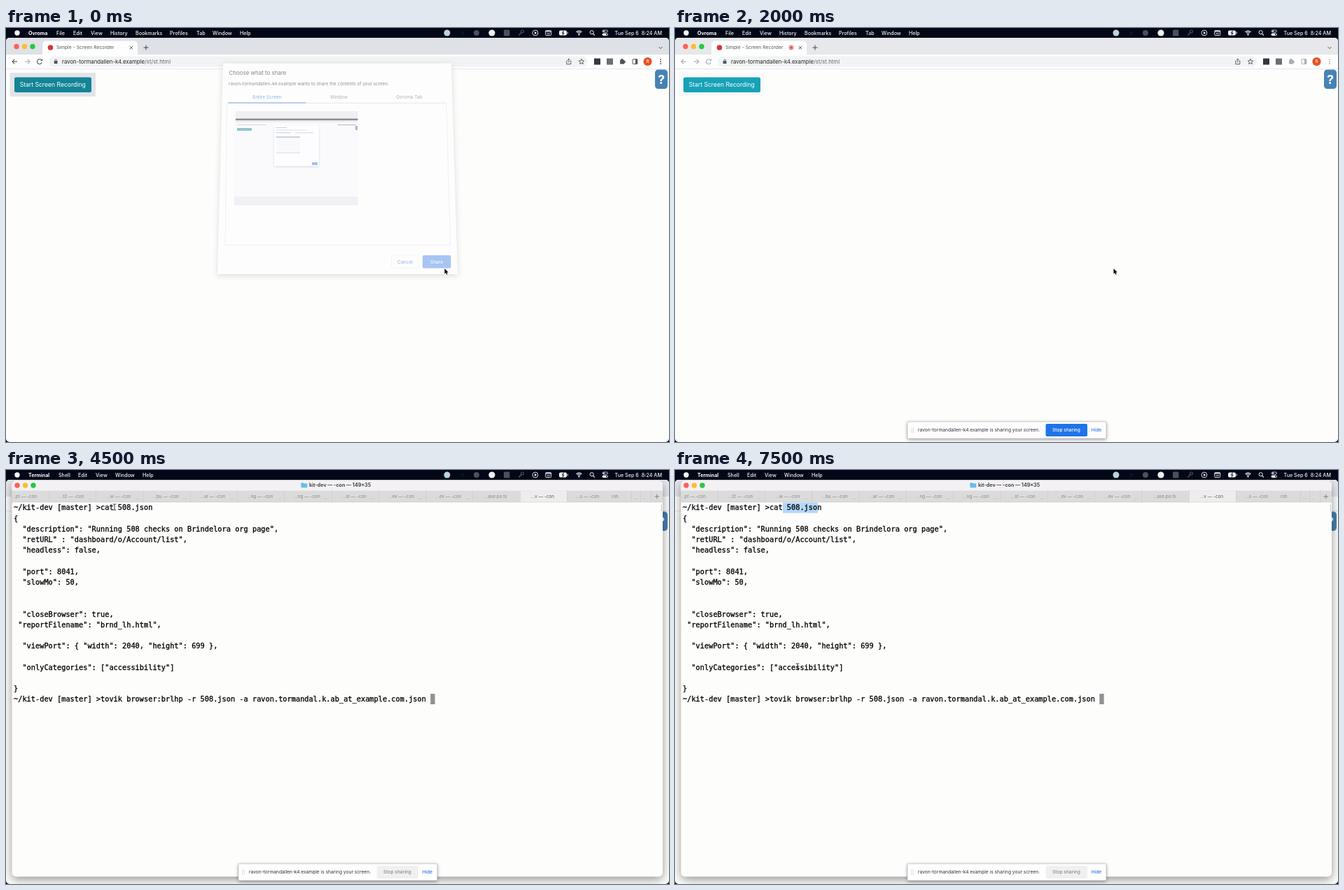
These frames come from a looping animation (947x592 px, 8 s). An HTML page with a canvas:

```html
<!DOCTYPE html>
<html lang="en">
<head>
<meta charset="utf-8">
<title>Screen recording demo</title>
<style>
  html, body { margin: 0; width: 100%; height: 100%; overflow: hidden; background: #000; }
  canvas { display: block; }
</style>
</head>
<body>
<canvas id="stage" width="947" height="592"></canvas>
<script>
const ctx = document.getElementById('stage').getContext('2d');
const LOOP = 8000, STEP = 500;
const HOST = 'ravon-tormandallen-k4.example';
const SANS = 'Inter, "Open Sans", sans-serif';
const MONO = '"DejaVu Sans Mono", "Liberation Mono", monospace';

// y is the middle of the capital letters
function text(str, x, y, size, color, weight = 400, align = 'left') {
  ctx.font = `${weight} ${size}px ${SANS}`;
  ctx.textAlign = align;
  ctx.fillStyle = color;
  ctx.fillText(str, x, y + size * 0.364);
}

function box(x, y, w, h, color, r = 0) {
  ctx.fillStyle = color;
  ctx.beginPath();
  ctx.roundRect(x, y, w, h, r);
  ctx.fill();
}

function frame(x, y, w, h, color, r = 0, width = 1) {
  ctx.strokeStyle = color;
  ctx.lineWidth = width;
  ctx.beginPath();
  ctx.roundRect(x, y, w, h, r);
  ctx.stroke();
}

function disc(x, y, r, color) {
  ctx.fillStyle = color;
  ctx.beginPath();
  ctx.arc(x, y, r, 0, 7);
  ctx.fill();
}

function ring(x, y, r, color, width = 1, from = 0, to = 2 * Math.PI) {
  ctx.strokeStyle = color;
  ctx.lineWidth = width;
  ctx.beginPath();
  ctx.arc(x, y, r, from, to);
  ctx.stroke();
}

function trace(points) {
  ctx.beginPath();
  points.forEach(([x, y], i) => i ? ctx.lineTo(x, y) : ctx.moveTo(x, y));
}

function line(points, color, width = 1) {
  trace(points);
  ctx.strokeStyle = color;
  ctx.lineWidth = width;
  ctx.stroke();
}

function shadowed(blur, color, dy, draw) {
  ctx.save();
  ctx.shadowBlur = blur;
  ctx.shadowColor = color;
  ctx.shadowOffsetY = dy;
  draw();
  ctx.restore();
}

function lights(x, y) {
  ['#ff5f57', '#febc2e', '#28c840'].forEach((c, i) => disc(x + i * 11.5, y, 3.7, c));
}

function menuBar(app, items) {
  box(0, 0, 947, 14, '#020817');
  disc(16, 7, 3.7, '#f4f4f6');
  text(app, 32, 7, 7.1, '#fff', 700);
  items.forEach(([name, x]) => text(name, x, 7, 7.15, '#f4f4f6', 500));

  const w = '#f0f0f3', dim = '#4b505c';
  disc(630, 7, 4.5, '#b9d5d8');
  disc(652, 7, 2.5, '#0c1322');
  disc(672, 7, 4, dim);
  disc(694, 7, 4.6, w);
  box(711, 2.5, 8.5, 9, dim, 1.5);
  ring(737.5, 5, 2, dim, 1.2);
  line([[736, 6.6], [732.5, 10.5]], dim, 1.5);
  ring(756, 7, 3.9, w, 0.9);
  trace([[755, 5], [758.3, 7], [755, 9]]);
  ctx.fillStyle = w;
  ctx.fill();
  frame(770.7, 3.5, 8, 7, w, 1, 0.9);
  line([[771, 5], [779, 5]], w, 1.3);
  line([[772.5, 8], [777, 8]], w);
  box(790, 3.5, 11, 7, w, 2);
  box(801.7, 5.5, 1, 3, w);
  line([[796.5, 4], [794.5, 7.3], [797, 7], [795, 10]], '#020817', 1);
  [1.6, 3.6, 5.6].forEach(r => ring(818.5, 9.7, r, w, 1.2, Math.PI * 1.25, Math.PI * 1.75));
  disc(818.5, 9.7, 0.9, w);
  ring(836.7, 6.2, 2.6, w, 1);
  line([[838.6, 8.2], [840.8, 10.5]], w, 1.1);
  frame(852, 3, 7.5, 3, w, 1.5, 0.8);
  box(851.6, 7.4, 8.3, 3.7, w, 1.8);
  disc(854, 4.5, 1.1, w);
  disc(858, 9.2, 1, '#020817');
  text('Tue Sep 6  8:24 AM', 937, 7, 7.2, w, 500, 'right');
}

function toolbar(active) {
  const dark = '#505357', c = active ? dark : '#a9acb0';
  line([[16, 48], [9, 48]], c, 1.1);
  line([[12.3, 44.7], [9, 48], [12.3, 51.3]], c, 1.1);
  line([[27, 48], [34, 48]], '#a9acb0', 1.1);
  line([[30.7, 44.7], [34, 48], [30.7, 51.3]], '#a9acb0', 1.1);
  ring(48, 48, 3.4, c, 1.1, 0.4, 5.4);
  trace([[49.2, 46.9], [52, 46.9], [52, 43.8]]);
  ctx.fillStyle = c;
  ctx.fill();

  box(61, 40.5, 770, 15, '#f1f3f4', 7.5);
  box(68.7, 47, 4.8, 4, dark, 0.6);
  ring(71.1, 46.7, 1.5, dark, 0.9, Math.PI, 0);
  text(HOST, 80, 48, 7.8, '#25272a');
  const hostWidth = ctx.measureText(HOST).width;
  text('/st/st.html', 80 + hostWidth, 48, 7.8, '#666a6e');

  line([[802, 47], [800.8, 47], [800.8, 51.7], [806.8, 51.7], [806.8, 47], [805.6, 47]], dark, 0.9);
  line([[803.8, 49.5], [803.8, 44]], dark, 0.9);
  line([[802.2, 45.5], [803.8, 44], [805.4, 45.5]], dark, 0.9);
  const star = [...Array(11).keys()].map(i => {
    const a = i * Math.PI / 5 - Math.PI / 2, r = i % 2 ? 1.8 : 4;
    return [822 + r * Math.cos(a), 48.2 + r * Math.sin(a)];
  });
  line(star, dark, 0.9);
  box(840, 43.5, 9, 9, '#343840');
  box(858, 43.5, 9, 9, '#6b6e72');
  box(877, 45.5, 6.3, 6, c, 0.8);
  disc(879.8, 45.2, 1.4, c);
  disc(883.4, 48.5, 1.4, c);
  frame(895, 44.6, 6.8, 6.8, c, 0.8, 1);
  box(899, 44.6, 2.8, 6.8, c);
  disc(916.5, 48, 6.1, '#e8501f');
  text('R', 916.5, 48, 6.5, '#fff', 400, 'center');
  [45, 48, 51].forEach(y => disc(935, y, 0.9, c));
}

function browser(active, recording) {
  box(0, 14, 947, 578, '#fdfdfc', 5);
  box(0, 14, 947, 25, active ? '#dee1e6' : '#e7e8eb', [5, 5, 0, 0]);
  lights(15, 26.5);
  box(52, 18.5, 136, 21, '#fefefe', [5, 5, 0, 0]);
  box(0, 38, 947, 20, '#fefefe');
  disc(63.5, 28, 3.8, '#d7323a');
  text('Simple - Screen Recorder', 72, 28, 6.8, '#55585c');
  if (recording) {
    ring(166, 28, 2.9, '#dc3b36', 0.9);
    disc(166, 28, 1.7, '#dc3b36');
  }
  line([[176.6, 26], [181, 30.4]], '#505357', 1);
  line([[181, 26], [176.6, 30.4]], '#505357', 1);
  line([[196.5, 28], [203.5, 28]], '#505357', 1.1);
  line([[200, 24.5], [200, 31.5]], '#505357', 1.1);
  line([[932.5, 27], [935, 29.5], [937.5, 27]], '#505357', 1);
  toolbar(active);
  box(0, 58, 947, 0.8, '#dfe1e3');

  box(5.5, 64, 122.5, 34, recording ? '#f8f9fa' : '#e0e4e7', 2);
  box(12, 70.5, 110, 21.5, recording ? '#17a2b8' : '#138496', 2.5);
  text('Start Screen Recording', 66.7, 81.3, 8.6, '#fff', 400, 'center');
  box(927, 59.5, 18, 27.5, '#4682b4', 4.5);
  text('?', 936, 73, 18, '#fff', 700, 'center');
}

function preview() {
  box(326, 119, 176.5, 134.5, '#fafafc');
  box(328, 119, 174.5, 10.5, '#f0f0f3');
  box(328, 129.5, 174.5, 2.6, '#8b8d93');
  box(328, 132.1, 174.5, 3, '#ecedf1');
  line([[330, 138.5], [372, 138.5]], '#cdd0d4', 0.8);
  line([[474, 138.5], [500, 138.5]], '#b9bcc2', 1.2);
  box(330, 143, 21, 4, '#93c5ce');
  box(499, 140, 3, 6, '#9eb9d3');
  shadowed(3, '#0002', 1, () => box(383, 139.5, 64, 58, '#fdfdff'));
  line([[385, 142.5], [401, 142.5]], '#c5c7cc', 0.8);
  line([[385, 146], [430, 146]], '#d3d5da', 0.8);
  line([[386, 149.8], [407, 149.8]], '#a6c2ec', 0.8);
  line([[413, 149.8], [439, 149.8]], '#cdd0d4', 0.8);
  box(386, 153, 34, 27, '#f9f9fc');
  line([[386, 156], [420, 156]], '#a9acb5', 1.2);
  line([[386, 178.5], [420, 178.5]], '#dedfe6', 1.2);
  box(437, 192, 8, 4, '#a3c1f1');
  box(326, 241, 176.5, 12.5, '#f0f0f5');
}

function dialog() {
  shadowed(9, 'rgba(60,60,80,.18)', 2, () => {
    trace([[310, 50.5], [636, 50.5], [645, 352], [302, 352]]);
    ctx.fillStyle = '#fdfdfd';
    ctx.fill();
  });
  text('Choose what to share', 318.5, 64, 7.95, '#85878a');
  text(HOST + ' wants to share the contents of your screen.', 318, 80, 6.38, '#929497');
  text('Entire Screen', 373, 98.5, 6.6, '#8fb3ec', 400, 'center');
  text('Window', 475.5, 98.5, 6.5, '#aeb0b4', 400, 'center');
  text('Ovroma Tab', 576, 98.5, 6.5, '#aeb0b4', 400, 'center');
  line([[315.5, 107.3], [313, 310.5], [634.5, 310.5], [629, 107.3]], '#ececf0', 0.8);
  line([[317, 107.3], [629, 107.3]], '#e1e3e8', 0.8);
  line([[317, 107], [428.5, 107]], '#82aaed', 1.2);
  preview();
  frame(550.5, 325, 39, 18.5, '#f2f3f7', 2, 0.8);
  text('Cancel', 570, 334.3, 6.7, '#91b2ec', 400, 'center');
  box(595, 325, 40.5, 18.5, '#a8c5f3', 2);
  text('Share', 615, 334.3, 6.6, '#fff', 400, 'center');
}

function shareBar(active) {
  shadowed(5, 'rgba(0,0,0,.4)', 1.5, () => box(332, 563, 284, 24, '#fefefe', 1));
  frame(332, 563, 284, 24, '#b8babd', 1, 0.7);
  for (let i = 0; i < 8; i++) disc(338 + i % 2 * 2.4, 572 + (i >> 1) * 2, 0.6, '#b4b6b9');
  text(HOST + ' is sharing your screen.', 347, 575, 6.67, '#2f3236');
  box(529.5, 566, 59.5, 18, active ? '#1f74e8' : '#f0f0f0', 2);
  text('Stop sharing', 559, 575, 6.6, active ? '#fff' : '#85878a', 500, 'center');
  text('Hide', 594.7, 575, 6.5, '#2775e6', 500);
}

const LINES = [
  '~/kit-dev [master] >cat 508.json',
  '{',
  '  "description": "Running 508 checks on Brindelora org page",',
  '  "retURL" : "dashboard/o/Account/list",',
  '  "headless": false,',
  '',
  '  "port": 8041,',
  '  "slowMo": 50,',
  '', '',
  '  "closeBrowser": true,',
  ' "reportFilename": "brnd_lh.html",',
  '',
  '  "viewPort": { "width": 2040, "height": 699 },',
  '',
  '  "onlyCategories": ["accessibility"]',
  '',
  '}',
  '~/kit-dev [master] >tovik browser:brlhp -r 508.json -a ravon.tormandal.k.ab_at_example.com.json'
];
const TABS = ['pt', 't2', 'w', 'bu', 'ar', 'ng', 'ng', 'st', 'ev', 'ev', 'ase.po.ts', 'v', 's'];

function terminal(selectEnd) {
  shadowed(14, 'rgba(0,0,0,.42)', 4, () => box(8.5, 15, 929.5, 566.5, '#fdfefc', 6));
  box(8.5, 15, 929.5, 15, '#f3f1f3', [6, 6, 0, 0]);
  box(8.5, 29.5, 929.5, 16.5, '#dcdbdc');
  lights(16, 22);
  box(421.5, 18.5, 4, 3, '#4aa9dc', 0.8);
  box(421.5, 19.3, 8.8, 6, '#62bfec', 0.8);
  text('kit-dev — -con — 149×35', 433, 21.8, 7.1, '#47474a', 700);

  TABS.forEach((name, i) => {
    const x = 734 + (i - 11) * 67.3, active = i === 11;
    if (active) box(x, 29.5, 67.3, 16.5, '#eeedee');
    box(Math.max(8.5, x), 29.5, 0.6, 16.5, '#c9c8c9');
    const label = '…' + name + (i === 10 ? '' : ' — -con');
    text(label, x + (i === 12 ? 29.5 : 32.5), 38, 6.4, active ? '#5c5c5e' : '#88888a', 400, 'center');
    if (i && i < 10) text('…', x + 59.5, 40, 6.4, '#8b8b8d', 400, 'center');
  });
  text('rsh.', 865, 38, 6.4, '#88888a');
  text('…', 897, 40, 6.4, '#8b8b8d');
  text('..', 910, 40, 6.4, '#8b8b8d');
  [893, 906, 921].forEach(x => box(x, 29.5, 0.6, 16.5, '#c9c8c9'));
  line([[926.5, 38], [933, 38]], '#777779', 0.9);
  line([[929.7, 34.8], [929.7, 41.2]], '#777779', 0.9);
  box(8.5, 45.7, 929.5, 0.6, '#c4c3c4');
  box(935.8, 49, 1, 10, '#c2c2c4');

  if (selectEnd) box(154, 46.5, selectEnd - 154, 15, '#b3d7fb');
  ctx.font = `10.3px ${MONO}`;
  ctx.textAlign = 'left';
  ctx.fillStyle = ctx.strokeStyle = '#000';
  ctx.lineWidth = 0.3;
  LINES.forEach((row, i) => {
    const y = 57.4 + i * 15.22;
    ctx.fillText(row, 11, y);
    ctx.strokeText(row, 11, y);
  });
  box(606.3, 320, 6.4, 15, '#929294');
}

// app tiles as they look half faded out
const APPS = [
  ['o', '#e8806f'], ['s', '#55585b'], ['s', '#9fcbea'], ['s', '#b4b8bb'], ['s', '#66b3ee'],
  ['o', '#e8806f'], ['o', '#f5914a'], ['o', '#e8806f'], ['s', '#3a9aec'], ['o', '#8fc39b'],
  ['s', '#f4f2f5'], ['s', '#3fca60'], ['s', '#efefef'], ['s', '#4fa1e0'], ['s', '#5d6070']
];

function badge(str, x, w) {
  box(x - w / 2, 267.5, w, 21.5, '#ef635b', 10.7);
  text(str, x, 278.3, 10.5, '#fff', 400, 'center');
}

function switcher() {
  ctx.save();
  ctx.globalAlpha = 0.45;
  box(12, 250, 922, 91, 'rgba(236,236,236,.55)', 12);
  box(87, 272.5, 48, 48, '#a9abad', 9);
  APPS.forEach(([shape, color], i) => {
    const x = 51 + i * 60.3;
    if (shape === 'o') disc(x, 296.5, i === 6 || i === 9 ? 24 : 20, color);
    else box(x - 22.5, 274, 45, 45, color, 9);
  });
  ctx.globalAlpha = 0.55;
  badge('2,703', 543, 36);
  badge('16', 792, 22);
  ctx.restore();
}

function arrow(x, y) {
  trace([[0, 0], [0, 7.6], [1.8, 6], [3, 8.8], [4.2, 8.2], [3, 5.6], [5.3, 5.4]]
    .map(([dx, dy]) => [x + dx, y + dy]));
  ctx.closePath();
  ctx.lineWidth = 1.4;
  ctx.strokeStyle = '#fff';
  ctx.stroke();
  ctx.fillStyle = '#000';
  ctx.fill();
}

function hand(x, y) {
  box(x - 2, y - 2, 6, 6, '#fff', 2);
  frame(x - 2, y - 1.5, 6, 5.5, '#333', 2, 0.9);
  line([[x - 3.2, y - 2.5], [x + 1, y - 2.5]], '#333', 1.3);
  line([[x, y], [x + 3.5, y]], '#555', 0.7);
  line([[x, y + 1.8], [x + 3.5, y + 1.8]], '#555', 0.7);
}

function beam(x, y) {
  line([[x, y - 3.8], [x, y + 3.8]], '#222', 0.9);
  for (const d of [-1, 1]) {
    line([[x - 2.2, y + d * 4.4], [x, y + d * 3.7], [x + 2.2, y + d * 4.4]], '#222', 0.9);
  }
}

const BROWSER_MENU = [['File', 72], ['Edit', 96], ['View', 121], ['History', 149], ['Bookmarks', 185],
  ['Profiles', 234], ['Tab', 272], ['Window', 295], ['Help', 334]];
const TERMINAL_MENU = [['Shell', 75], ['Edit', 103], ['View', 128], ['Window', 156], ['Help', 195]];

// pointer stops, one per step, from step 6 on
const STOPS = [[626, 344], [324, 173], [206, 75], [155, 53], [155, 53],
  [190, 52], [203, 53], [140, 318], [160, 328], [175, 281]];

function draw(step) {
  const inTerminal = step >= 5;
  ctx.fillStyle = '#020817';
  ctx.fillRect(0, 0, 947, 592);
  browser(step === 0, step >= 2);
  if (step === 0) dialog();
  if (inTerminal) terminal(step < 11 ? 0 : step === 11 ? 191 : 204);
  if (inTerminal) menuBar('Terminal', TERMINAL_MENU);
  else menuBar('Ovroma', BROWSER_MENU);
  if (step === 5) switcher();
  if (step > 0) shareBar(!inTerminal);
  if (!inTerminal) arrow(626.5, 344);
  else if (step === 5) hand(627, 348.5);
  else beam(...STOPS[step - 6]);
}

let shown = -1;
const start = performance.now();
function tick() {
  const step = Math.floor((performance.now() - start) % LOOP / STEP);
  if (step !== shown) draw(shown = step);
  requestAnimationFrame(tick);
}
tick();
</script>
</body>
</html>
```
